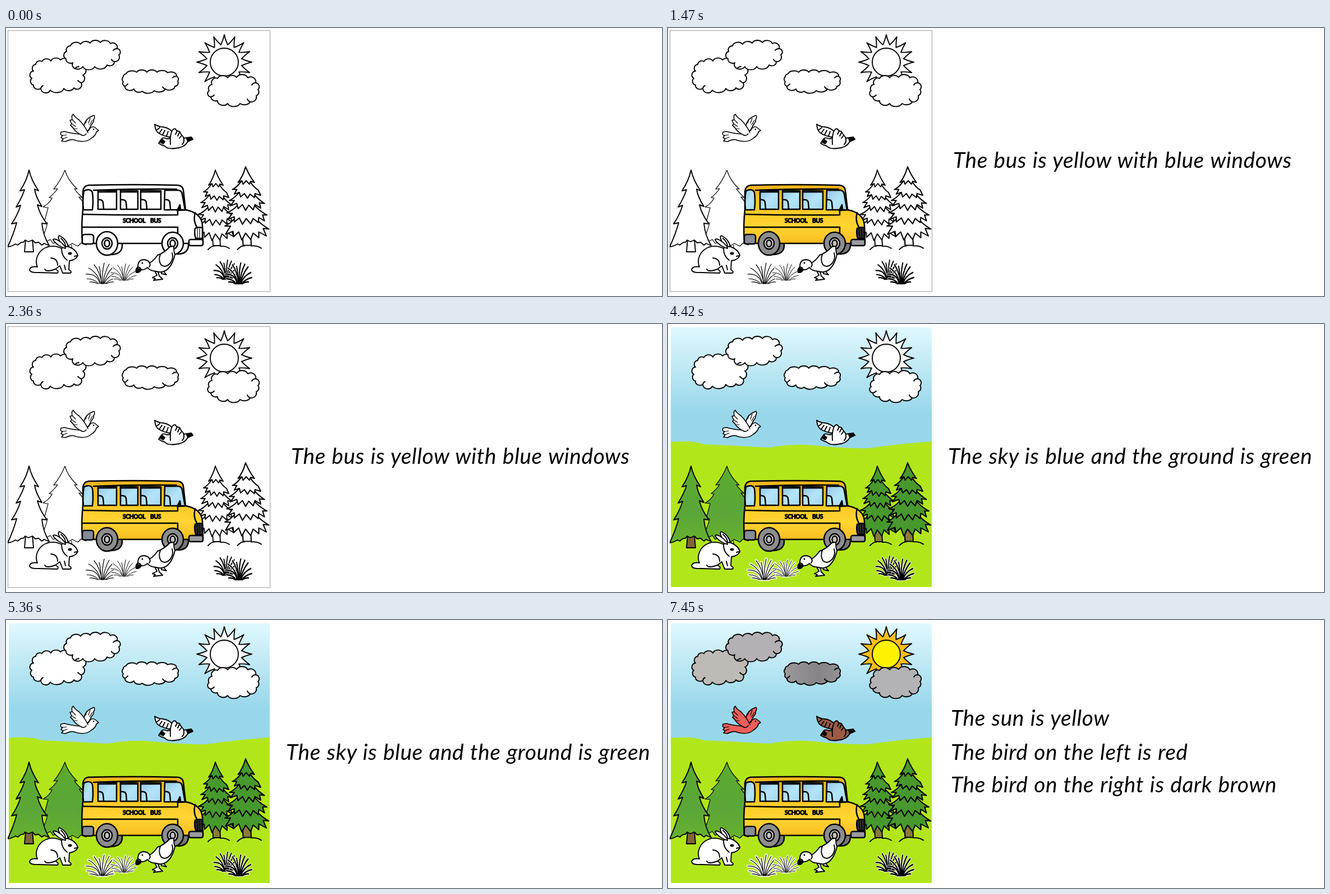
An HTML page without scripts for the animation above (8000 ms loop, 1169 px wide and 479 px high).

```html
<!DOCTYPE html>
<html lang="en">
<head>
<meta charset="utf-8">
<title>Colour the picture</title>
<style>
html, body { margin: 0; width: 100%; height: 100%; overflow: hidden; background: #fff; }
svg { display: block; width: 100vw; height: 100vh; }
.art { fill: #fff; stroke: #000; stroke-width: 1.9; stroke-linejoin: round; stroke-linecap: round; }
.line { fill: none; }
.ink { fill: #000; }
.bare { stroke: none; }
.thin { stroke-width: 1.2; }
.bold { stroke-width: 2.5; }
.say { font: italic 38.8px Lato, Carlito, sans-serif; letter-spacing: .6px; word-spacing: 1.1px; }
.sign { font: 700 10.5px Lato, sans-serif; letter-spacing: -.5px; fill: #000; stroke-width: 1; }

/* every step is a hard cut; --c is the colour a part receives */
.p1, .p2, .p4, .p5, .s3, .t1, .t2, .t3, .t4, .t5 { animation: 8s step-end infinite; }
.p1 { animation-name: bus; }
.p2 { animation-name: trees; }
.p4 { animation-name: clouds; }
.p5 { animation-name: birds; }
.s3 { animation-name: land; }
.t1 { animation-name: say1; }
.t2 { animation-name: say2; }
.t3 { animation-name: say3; }
.t4 { animation-name: say4; }
.t5 { animation-name: say5; }
@keyframes bus    { 0% { fill: #fff } 18.375%, 100% { fill: var(--c) } }
@keyframes trees  { 0% { fill: #fff } 36.875%, 100% { fill: var(--c) } }
@keyframes clouds { 0% { fill: #fff } 74.75%, 100% { fill: var(--c) } }
@keyframes birds  { 0% { fill: #fff } 93.125%, 100% { fill: var(--c) } }
@keyframes land   { 0% { opacity: 0 } 55.25%, 100% { opacity: 1 } }
@keyframes say1 { 0% { opacity: 0 } 18.375% { opacity: 1 } 36.875%, 100% { opacity: 0 } }
@keyframes say2 { 0% { opacity: 0 } 36.875% { opacity: 1 } 55.25%, 100% { opacity: 0 } }
@keyframes say3 { 0% { opacity: 0 } 55.25% { opacity: 1 } 74.75%, 100% { opacity: 0 } }
@keyframes say4 { 0% { opacity: 0 } 74.75% { opacity: 1 } 93.125%, 100% { opacity: 0 } }
@keyframes say5 { 0% { opacity: 0 } 93.125%, 100% { opacity: 1 } }
</style>
</head>
<body>
<svg viewBox="0 0 1169 479">
<defs>
  <linearGradient id="sky" x2="0" y2="1">
    <stop stop-color="#e0f8fe"/><stop offset=".7" stop-color="#98d7ea"/>
  </linearGradient>
  <linearGradient id="body" x2="0" y2="1">
    <stop stop-color="#f0b41c"/><stop offset=".3" stop-color="#fbc422"/>
    <stop offset=".7" stop-color="#ffd433"/><stop offset="1" stop-color="#f7bd20"/>
  </linearGradient>
  <linearGradient id="glass" x2="1" y2="1">
    <stop stop-color="#8fc4e0"/><stop offset=".5" stop-color="#b4e4f7"/><stop offset="1" stop-color="#a5d8ef"/>
  </linearGradient>
  <linearGradient id="fir" x2="0" y2="1">
    <stop stop-color="#5caa2e"/><stop offset=".6" stop-color="#5aa638"/><stop offset="1" stop-color="#68b02f"/>
  </linearGradient>
  <linearGradient id="storm">
    <stop stop-color="#9c999c"/><stop offset=".6" stop-color="#878487"/><stop offset="1" stop-color="#949194"/>
  </linearGradient>

  <path id="ray" d="M-6.2-31Q-2.6-38 0-49Q2.6-38 6.2-31"/>
  <g id="ray2"><use href="#ray"/><use href="#ray" transform="rotate(22.5)"/></g>
  <g id="ray4"><use href="#ray2"/><use href="#ray2" transform="rotate(45)"/></g>
  <g id="ray8"><use href="#ray4"/><use href="#ray4" transform="rotate(90)"/></g>

  <path id="trunk" d="M-5 116L-4 135H9L8 116"/>
  <path id="roots" d="M-13 142Q-6 135-2 136M9 136Q18 135 25 140"/>
  <g id="spruce">
    <path d="M0 60Q-14 92-33 102l9 0-8 14 12-5 1 9 8-8 5 14 6-12 8 11 4-11 9 8 0-10 12 7-5-13 9 1Q12 92 0 60z"/>
    <path d="M0 45Q-12 72-30 79l9 1-7 10 10-4 0 9 8-7 5 11 6-10 7 9 4-9 8 7 1-9 9 6-3-10 7 0Q14 72 0 45z"/>
    <path d="M0 25Q-10 50-26 58l8 0-6 9 10-4 2 9 7-7 5 10 5-9 7 8 3-9 9 6-2-9 8 1Q11 50 0 25z"/>
    <path d="M0 10Q-8 32-21 39l7 0-4 8 8-3 2 8 6-6 5 8 4-7 7 6 1-7 9 3-4-9Q8 32 0 10z"/>
    <path d="M0 0Q-4 16-12 27l6-3 2 6 5-6 5 6 2-5 6 2Q5 14 0 0z"/>
  </g>

  <path id="seat" d="M1 17Q9 16 10 22L11 33"/>

  <path id="blades" d="M-4 0Q-8-18-29-17M-2 0Q-8-20-24-28M-6 0Q-12-8-27-9M0 0Q-4-22-14-34M-1 0Q-2-20-5-31M1 0Q0-22 4-37M2 0Q4-20 13-35M3 0Q8-18 20-30M4 0Q10-14 26-20M6 0Q14-8 28-11M-8 0Q-14-4-22-3M8 0Q14-4 21-3"/>
  <g id="tuft"><use href="#blades" stroke="#fff" stroke-width="4.5"/><use href="#blades"/></g>

  <clipPath id="stage"><rect x="3" y="4" width="468" height="468"/></clipPath>
</defs>

<rect x="3.5" y="4.5" width="467" height="466.5" fill="none" stroke="#b5b5b5" stroke-width="1.4"/>
<g class="s3">
  <path fill="#fff" d="M2 3H473V473H2z"/>
  <path fill="url(#sky)" d="M5 6H470V224H5z"/>
  <path fill="#b2e61b" d="M5 211Q40 207 65 215Q110 217 180 221Q225 213 260 217Q320 223 358 222Q420 213 470 210V470H5z"/>
</g>

<g class="art" clip-path="url(#stage)">
  <!-- sun -->
  <g transform="translate(389 61)">
    <g class="p5" style="--c:#fdbd18">
      <circle class="bare" r="31.5"/>
      <use href="#ray8"/><use href="#ray8" transform="rotate(180)"/>
    </g>
    <circle class="p5" style="--c:#fff200" r="25"/>
  </g>

  <!-- clouds -->
  <path class="p4" style="--c:#bebbb6" d="M49 77A7 7 0 0 1 53 65A7 7 0 0 1 64 60A9 8 0 0 1 80 59A10 9 0 0 1 97 57A10 9 0 0 1 114 61A10 9 0 0 1 130 69A9 8 0 0 1 137 84A8 8 0 0 1 134 98A8 8 0 0 1 121 107A10 8 0 0 1 103 108A13 9 0 0 1 79 111A9 9 0 0 1 62 108A8 7 0 0 1 49 102A7 7 0 0 1 46 90A7 7 0 0 1 49 77z"/>
  <path class="p4" style="--c:#b4b1b4" d="M115 32A10 8 0 0 1 133 29A10 8 0 0 1 150 27A10 8 0 0 1 168 26A10 8 0 0 1 186 28A8 8 0 0 1 198 37A6 6 0 0 1 201 48A8 8 0 0 1 193 60A8 7 0 0 1 180 66A12 9 0 0 1 158 69A11 8 0 0 1 137 69A10 8 0 0 1 119 62A8 7 0 0 1 107 55A7 7 0 0 1 108 42A7 7 0 0 1 115 32z"/>
  <path class="p4" style="--c:url(#storm)" d="M214 82A11 7 0 0 1 233 79A10 7 0 0 1 251 79A10 7 0 0 1 269 79A11 7 0 0 1 288 80A10 7 0 0 1 304 86A6 6 0 0 1 306 95A6 6 0 0 1 301 104A10 7 0 0 1 284 109A12 8 0 0 1 264 112A12 8 0 0 1 243 113A9 7 0 0 1 228 109A9 7 0 0 1 212 104A5 5 0 0 1 209 96A6 6 0 0 1 209 87A6 5 0 0 1 214 82z"/>
  <path class="p4" style="--c:#b3b3b5" d="M367 101A8 8 0 0 1 377 90A10 8 0 0 1 395 89A10 9 0 0 1 411 88A11 9 0 0 1 431 89A9 9 0 0 1 445 98A7 7 0 0 1 449 110A7 7 0 0 1 446 121A9 9 0 0 1 435 132A11 8 0 0 1 417 135A12 9 0 0 1 395 135A10 8 0 0 1 377 130A9 8 0 0 1 365 123A6 6 0 0 1 362 112A7 7 0 0 1 367 101z"/>
  <path class="line" d="M130 69q-5 0-7 4M134 98q-3-1-6-4M62 108q1-4 4-5M198 37q-5 0-7 3M193 60q-4-1-5-4M304 86q-5 0-7 3M284 109q-4-1-5-4M212 104q3-1 5-4M445 98q-5 0-7 4M435 132q-4-2-5-5M365 123q3 0 6-3"/>

  <!-- birds -->
  <g class="p5" style="--c:#ee5f5b" stroke-width="1.6">
    <path d="M139 174Q142 161 157 156Q159 160 156 164Q157 168 154 170Q152 173 148 181L140 188z"/>
    <path d="M165 183L160 179Q155 174 150 179Q146 187 136 190Q118 189 104 185L98 186Q96 192 101 192L98 196L102 198L99 202L106 203Q118 197 124 201Q142 206 152 197Q160 192 161 186z"/>
    <path d="M146 187Q140 174 130 164Q122 159 120 154Q116 156 118 164L114 165Q116 169 117 171L115 174Q119 177 121 181Q126 187 134 191Q139 194 143 189"/>
    <path class="line thin" d="M118 164l6 6M117 171l7 5M121 180l6 0M144 163l-2 7M150 161l-3 9M154 165l-5 8M101 192l7-1M102 198l7-3"/>
    <circle class="ink bare" cx="156" cy="181" r="1.2"/>
  </g>
  <g class="p5" style="--c:#9b5a45">
    <path d="M265 172Q266 184 272 188Q280 193 292 195L298 187Q290 178 280 177Q270 176 265 172z"/>
    <path d="M272 206L276 200Q279 194 287 198Q300 195 316 197L330 195L333 199L324 203Q318 214 302 215Q288 217 283 211Q276 209 272 206z"/>
    <path d="M293 208Q292 193 295 186Q297 180 301 180L305 184L309 185L312 190L316 195Q319 203 314 208"/>
    <path class="line" d="M269 182l5-4M273 188l5-7M279 191l4-8M286 193l3-8M305 184l-3 6M309 187l-3 6M313 192l-4 5"/>
    <path class="ink" d="M322 198L330 195L333 199L324 203zM274 204l4-5 5 4-3 4z"/>
  </g>

  <!-- left trees -->
  <path class="p2 thin" style="--c:url(#fir)" d="M105 254Q98 272 85 288L92 287Q86 296 77 303L82 304Q77 314 66 320L75 321Q71 338 67 349L74 348Q71 364 62 378L70 376L73 381L79 378L84 385L91 382L98 388L106 384L112 389L118 385L128 390L134 384L143 388V318L130 302L136 303Q124 292 122 287L127 288Q110 272 105 254z"/>
  <path class="line thin" d="M117 388v8"/>
  <path class="p2" style="--c:#7f6539" d="M35 378L33 400H49L47 378z"/>
  <path class="p2" style="--c:url(#fir)" d="M41 254Q37 273 25 291L33 289Q28 304 18 320L26 317Q20 336 10 350L19 348Q13 370 3 391Q11 390 17 386L21 388Q27 382 31 383L34 379L40 382L47 379L52 384L58 383L64 388L68 385L77 389Q66 371 64 349L73 350Q60 333 56 316L64 319Q53 302 51 288L58 291Q45 272 41 254z"/>

  <!-- right trees -->
  <g transform="translate(373 254)">
    <use class="p2" style="--c:#8b7b3c" href="#trunk"/>
    <use class="line" href="#roots"/>
    <use class="p2" style="--c:#47982d" href="#spruce"/>
  </g>
  <g transform="translate(427 248) scale(1.12 1.04)">
    <use class="p2" style="--c:#8b7b3c" href="#trunk"/>
    <use class="line" href="#roots"/>
    <use class="p2" style="--c:#47982d" href="#spruce"/>
  </g>

  <!-- bus -->
  <g class="bold">
    <path class="p1" style="--c:#777" d="M186 366Q208 368 207 390Q206 404 188 405zM304 366Q326 368 325 390Q323 404 306 404z"/>
    <path class="p1" style="--c:url(#body)" d="M137 292Q138 282 147 281Q228 279 306 281Q315 282 316 290L320 325Q348 330 350 352L351 381L326 385H136Q134 350 137 325z"/>
    <path class="line" d="M156 290Q230 287 304 288M137 333Q220 335 306 334M136 356H306V384M306 334V326L322 325M337 330Q333 344 340 356"/>
    <g class="p1" style="--c:url(#glass)">
      <path d="M139 291Q151 286 154 294Q156 310 154 325H138Q136 306 139 291z"/>
      <path d="M164 290L197 291V324H164z"/>
      <path d="M204 290L235 291V324H204z"/>
      <path d="M240 290L276 291V324H240z"/>
      <path d="M283 290H308Q313 291 314 297L319 325H282z"/>
    </g>
    <g class="line">
      <use href="#seat" x="163" y="290"/><use href="#seat" x="204" y="290"/>
      <use href="#seat" x="240" y="290"/><use href="#seat" x="282" y="290"/>
      <path d="M164 293H197M204 293H235M240 293H276"/>
    </g>
    <path class="ink" d="M305 326L310 316L311 324z"/>
    <path class="p1" style="--c:#2b2b2b" d="M337 358Q343 355 350 357V376H338Q335 366 337 358z"/>
    <path class="line thin" d="M341 358V375M345 358V375"/>
    <rect class="p1" style="--c:#858b98" x="136" y="369" width="20" height="17" rx="4"/>
    <rect class="p1" style="--c:#9b9b9f" x="326" y="378" width="25" height="11" rx="3"/>
    <g class="p1" style="--c:#8d8d8d">
      <ellipse cx="180" cy="385" rx="19" ry="21"/><ellipse cx="297" cy="385" rx="19" ry="20"/>
    </g>
    <g class="p1" style="--c:#e4e4e4">
      <ellipse cx="180" cy="385" rx="9" ry="10"/><ellipse cx="297" cy="385" rx="9" ry="10"/>
    </g>
    <g class="p1" style="--c:#c4c4c4">
      <ellipse cx="180" cy="385" rx="4.6" ry="6"/><ellipse cx="297" cy="385" rx="4.6" ry="6"/>
    </g>
    <text class="sign" y="348"><tspan x="208">SCHOOL</tspan><tspan x="257">BUS</tspan></text>
  </g>

  <!-- rabbit -->
  <path d="M111 392Q109 378 95 371Q91 373 97 384L104 394z"/>
  <path d="M127 404Q124 396 112 391Q104 389 99 394Q85 387 72 392Q56 399 54 416Q54 423 56 427Q44 425 42 432Q43 438 58 437L92 438Q95 434 88 431L96 425L101 438H115Q118 435 112 432L113 416Q126 414 128 406z"/>
  <path d="M106 394Q92 390 84 379Q84 376 90 378Q100 383 106 392"/>
  <path class="line" d="M69 431Q72 437 88 431M80 411Q92 412 92 424M104 424l2 8M98 376Q105 382 106 389M122 408l5-1M99 394Q99 408 109 415"/>
  <ellipse class="ink bare" cx="114" cy="403" rx="3.5" ry="2.4"/>

  <!-- grass -->
  <g class="line thin">
    <use href="#tuft" transform="translate(171 457)"/>
    <use href="#tuft" transform="translate(210 451) scale(.8)"/>
  </g>
  <g class="line bold">
    <use href="#tuft" transform="translate(392 449) scale(.74 .92)"/>
    <use href="#tuft" transform="translate(415 457) scale(.82 1)"/>
  </g>

  <!-- duck -->
  <path d="M265 434L269 442L261 446L266 448L263 451L279 449L273 443L271 435zM276 434L277 439L286 441L280 434z"/>
  <path d="M232 435Q230 432 235 427Q235 414 246 414Q254 415 256 420Q264 415 270 406Q282 402 292 391L299 390Q299 400 301 405Q298 420 290 429Q281 439 268 435Q256 434 252 428Q246 433 241 432Q238 438 232 437z"/>
  <path class="line" d="M275 405Q271 414 276 423Q284 430 293 420Q299 412 296 402M235 427Q240 428 241 432M256 420Q258 424 255 427"/>
  <path class="ink" d="M232 435L235 429L240 432Q237 437 232 436z"/>
  <circle class="ink bare" cx="243" cy="420" r="1.5"/>
</g>

<g class="say">
  <text class="t1" x="508" y="250">The bus is yellow with blue windows</text>
  <text class="t2" x="512" y="250">All the trees are dark green</text>
  <text class="t3" x="499" y="250">The sky is blue and the ground is green</text>
  <text class="t4" x="513" y="250">The clouds are are in dark gray</text>
  <g class="t5">
    <text x="504" y="189">The sun is yellow</text>
    <text x="504" y="250">The bird on the left is red</text>
    <text x="504" y="308">The bird on the right is dark brown</text>
  </g>
</g>
</svg>
</body>
</html>
```
